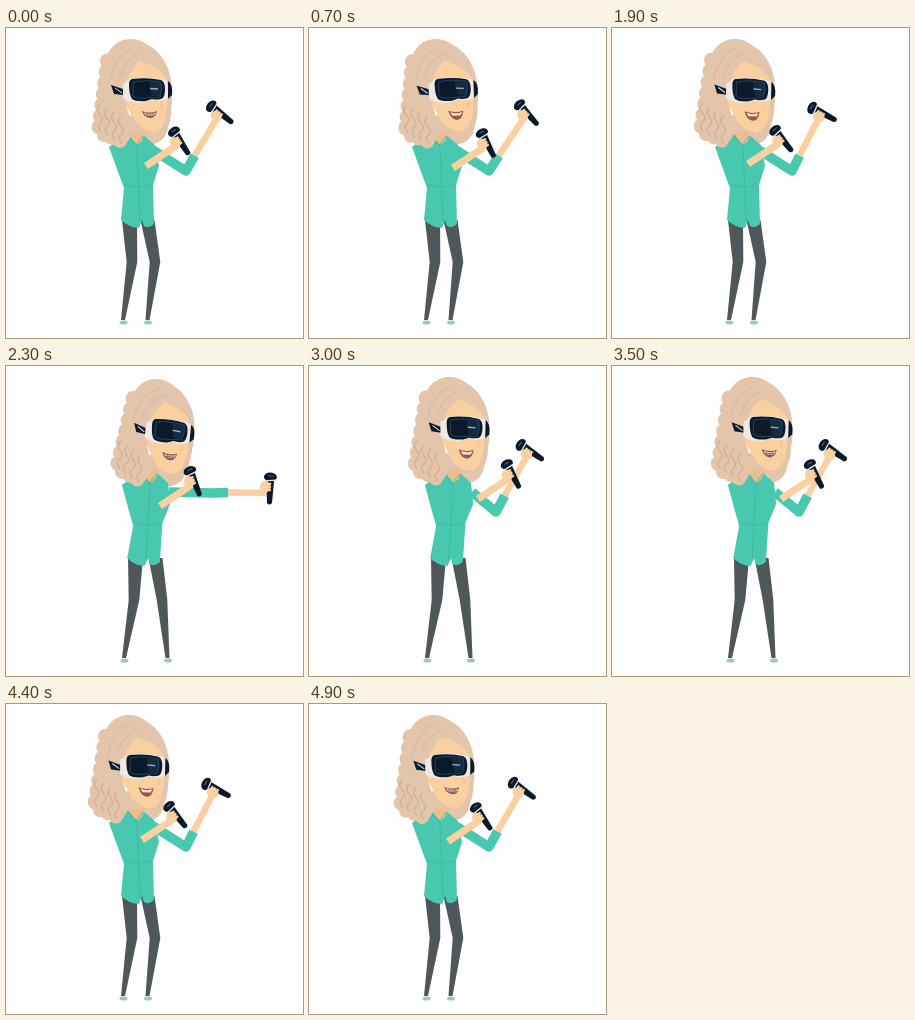
An HTML page with a canvas that plays this animation: 297x310 px, repeating every 5000 ms.

```html
<!DOCTYPE html>
<html lang="en">
<head>
<meta charset="utf-8">
<title>VR singer</title>
<style>
html, body { margin: 0; width: 100%; height: 100%; overflow: hidden; background: #fefefe; }
canvas { display: block; }
</style>
</head>
<body>
<canvas id="stage" width="297" height="310"></canvas>
<script>
const ctx = document.getElementById('stage').getContext('2d');
const LOOP = 5000, STEP = 100, TAU = Math.PI * 2;
const HAIR = '#e2c5aa', CURL = '#d5b197', SKIN = '#fad0a0', SHADE = '#edbd90';
const TEAL = '#48c8ae', DEEP = '#3bb89c', LEG = '#50575b', BLACK = '#0a1a2b', WHITE = '#ece9e6';

function ramp(t, from, to) {
  const k = Math.min(1, Math.max(0, (t - from) / (to - from)));
  return k * k * (3 - 2 * k);
}

// She sways, steps aside, punches the far arm out, then steps back.
function poseAt(t) {
  const lean = ramp(t, 1900, 2300) - ramp(t, 3600, 4000);
  const punch = ramp(t, 1900, 2300) - ramp(t, 2300, 2900);
  const sway = 4 * Math.sin(t / LOOP * 2 * TAU) * (1 - lean);
  return {
    lean,
    head: [sway + 13 * lean + 5 * punch, 2 * punch, 2 * lean + 4 * punch - sway * .4],
    mouth: .4 - .4 * Math.cos(t / LOOP * 4 * TAU),
    near: [171 + sway + 29 * lean - 15 * punch, 115 + sway / 2 - 5 * lean + 7 * punch, 57 + sway * 1.5 + 5 * lean + 6 * punch],
    far: [211 + sway + 7 * lean + 43 * punch, 88 + 37 * punch, 38 + sway * 2.5 - 4 * lean + 58 * punch],
    elbow: [180 + 7 * lean + 20 * punch, 143 + 3 * lean - 19 * punch]
  };
}

function fill(d, color) {
  ctx.fillStyle = color;
  ctx.fill(new Path2D(d));
}

function stroke(d, width, color) {
  ctx.lineWidth = width;
  ctx.strokeStyle = color;
  ctx.stroke(new Path2D(d));
}

function line(pts, width, color) {
  stroke('M' + pts.join('L'), width, color);
}

function oval(x, y, rx, ry, color) {
  ctx.beginPath();
  ctx.ellipse(x, y, rx, ry, 0, 0, TAU);
  ctx.fillStyle = color;
  ctx.fill();
}

function placed(x, y, deg, paint) {
  ctx.save();
  ctx.translate(x, y);
  ctx.rotate(deg * TAU / 360);
  paint();
  ctx.restore();
}

function mic(x, y, deg) {
  placed(x, y, deg, () => {
    fill('M-10 -4L15 -2.5Q18 0 15 2.5L-10 4Z', BLACK);
    oval(-11, 0, 4.5, 6.5, BLACK);
    line([[-8, -6], [-7, 6]], 1.3, WHITE);
    line([[-12, -3], [-12, 2]], .8, '#71818b');
    oval(-1, 5, 6, 5, SKIN);
    for (let i = -1; i < 2; i++) line([[i * 3 - 1, -1], [i * 3 - 1, 5]], 2.6, SKIN);
  });
}

function farArm({ lean, elbow, far: [x, y, deg] }) {
  const cuff = elbow.map((v, i) => v + ([x, y][i] - v) * .28);
  line([cuff, [x, y + 2]], 6.5, SKIN);
  line([[147 + 16 * lean, 122 + 4 * lean], elbow, cuff], 9.5, TEAL);
  mic(x + 3, y - 3, deg);
}

function nearArm([x, y, deg]) {
  line([[x - 31, y + 23], [x - 1, y + 3]], 7, SKIN);
  mic(x + 3, y - 2, deg);
}

// A leg tapers from hip to knee to ankle.
function leg(hip, knee, ankle, wide) {
  const joints = [[hip, 192, wide], [knee, 234, 5.3], [ankle, 292, 2]];
  const side = s => joints.map(([x, y, w]) => [x + s * w, y]);
  fill('M' + [...side(-1), ...side(1).reverse()].join('L') + 'Z', LEG);
  oval(ankle + .5, 294.5, 4, 2, '#9cc9b4');
}

function body(lean) {
  leg(141.5 + 8 * lean, 149 + 7 * lean, 141.5 + 20 * lean, 7);
  leg(123.5 + 6 * lean, 126 + 2 * lean, 117 + lean, 7.5);
  ctx.save();
  ctx.transform(1, 0, -.091 * lean, 1, 23.7 * lean, 0);
  fill('M103 119L112 112L122 107H137L149 117L153 138L147 157L148 196Q143 201 138 198L136 192L133 200Q122 199 115 192L118 160L111 141Z', TEAL);
  fill('M121 105L139 104L136 113L131 117Z', SHADE);
  stroke('M121 107L130 117L137 108M131 117L134 194M119 157Q132 161 146 157', .8, DEEP);
  ctx.restore();
}

function hairBack() {
  fill('M118 90L164 70Q167 88 162 99Q160 113 148 116Q132 120 118 114Z', HAIR);
}

function hairFront() {
  fill('M125 11C110 11 101 22 98 38L92 104Q104 120 119 117Q126 109 127 100L118 70Q118 48 133 33Q153 38 160 50L163 94Q168 72 165 52C163 37 154 23 142 17Q134 11 125 11Z', HAIR);
  for (let i = 0; i < 7; i++) oval(101 - i * 1.4, 33 + i * 11, 7, 7.5, HAIR);
  for (let i = 0; i < 3; i++) oval(98 + i * 8, 107 + i * 3, 7, 7, HAIR);
  for (let i = 0; i < 4; i++) stroke(`M${94 + i * 7} ${76 + i * 4}q-5 5 0 10q5 5 0 9q-4 3 1 9`, 1.5, CURL);
  stroke('M126 20Q108 28 104 52M134 25Q118 32 113 50', .8, CURL);
}

function face(open) {
  fill('M133 32Q152 37 162 50L161 82Q158 103 148 104Q139 104 130 95L117 72Q117 48 133 32Z', SKIN);
  stroke('M154 73Q159 79 154 80', 1, SHADE);
  fill(`M136 83Q144 86 151 83Q150 ${90 + open * 3} 144 ${90 + open * 3}Q138 ${89 + open * 3} 136 83Z`, '#9a5846');
  fill('M138 84.5Q144 87 150 84.5L148 88H140Z', '#f4e3d3');
  if (open < .3) stroke('M138 87H149M141 85V89M144 86V90M147 85V89', .7, '#5d5552');
}

function headset() {
  fill('M105 57L117 61L118 67L108 66Z', BLACK);
  line([[109, 60], [116, 65]], 1, WHITE);
  fill('M117 56L124 51Q142 48 161 52L163 70Q156 75 145 72L136 75Q122 75 117 70Z', WHITE);
  fill('M162 53Q167 56 166 67L162 71Z', BLACK);
  fill('M126 51Q142 49 155 52Q159 54 159 61Q159 70 155 71Q150 72 146 71L140 73Q130 74 126 71Q123 66 123 56Q123 52 126 51Z', BLACK);
  fill('M143 53L155 54Q157 62 154 68L146 68Z', '#142c42');
  stroke('M127 54Q142 51 155 54Q157 61 154 69L139 70Q130 71 127 68Z', .7, '#3a5064');
  line([[144, 60.5], [152, 61]], 1.3, '#a3b0ba');
}

function onHead([x, y, tilt], paint) {
  placed(128 + x, 105 + y, tilt, () => {
    ctx.translate(-128, -105);
    paint();
  });
}

function draw(now) {
  const pose = poseAt(Math.floor(now % LOOP / STEP) * STEP);
  ctx.fillStyle = '#fefefe';
  ctx.fillRect(0, 0, 297, 310);
  ctx.lineJoin = 'round';
  farArm(pose);
  onHead(pose.head, hairBack);
  body(pose.lean);
  onHead(pose.head, () => {
    face(pose.mouth);
    hairFront();
    headset();
  });
  nearArm(pose.near);
}

const start = performance.now();
function tick() {
  draw(performance.now() - start);
  requestAnimationFrame(tick);
}
tick();
</script>
</body>
</html>
```
